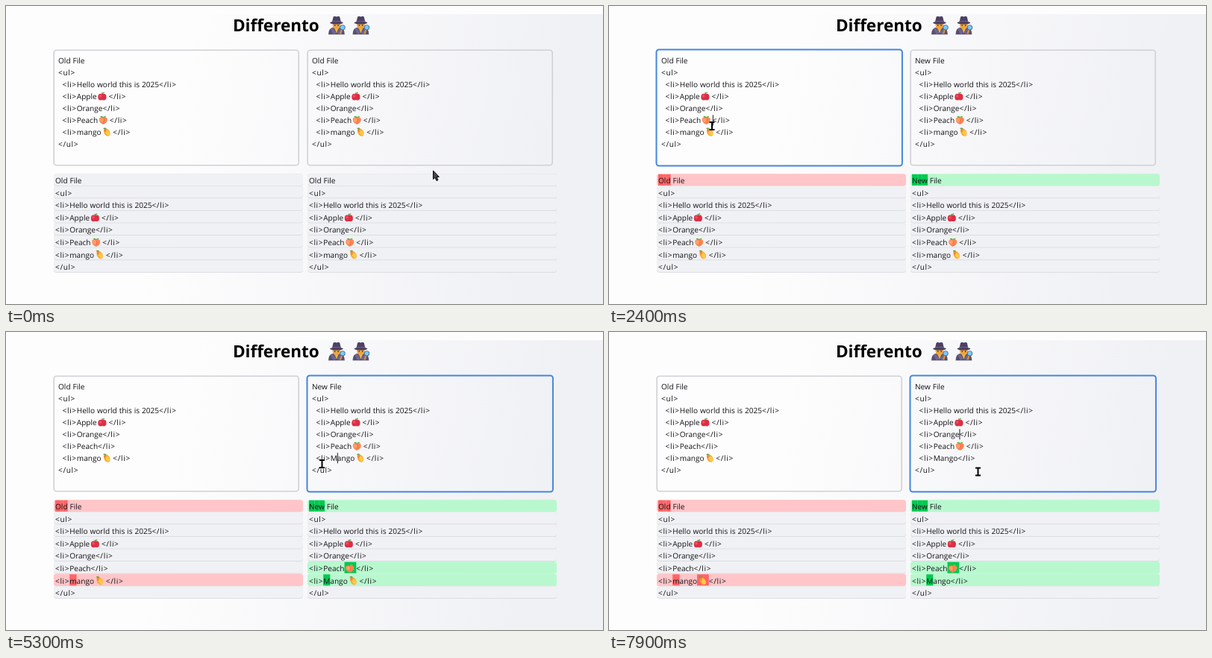
Animation, 800 px wide and 400 px high, one loop 8 s. Source, as an HTML page with a canvas:

```html
<!DOCTYPE html>
<html lang="en">
<head>
<meta charset="utf-8">
<title>Differento</title>
<style>
  html, body { margin: 0; width: 100%; height: 100%; overflow: hidden; background: #fdfdfd; }
  canvas { display: block; width: 800px; height: 400px; }
</style>
</head>
<body>
<canvas id="stage" width="800" height="400"></canvas>
<script>
const ctx = document.getElementById('stage').getContext('2d');
const LOOP = 8000;
const FONT = '10.08px "Open Sans", "Noto Sans", sans-serif';
const EMOJI_WIDTH = 15.8;
const PANEL_X = [64, 404];
const SIDES = [
  { row: '#ffc5c8', mark: '#ff6467' },
  { row: '#b9f8cf', mark: '#00c950' },
];
const START = [
  'Old File', '<ul>', '  <li>Hello world this is 2025</li>', '  <li>Apple🍎</li>',
  '  <li>Orange</li>', '  <li>Peach🍑</li>', '  <li>mango🥭</li>', '</ul>',
];

// Clicks and key presses: time, side, row, text before and after the caret
const STEPS = [
  [700, 1, 0, 'Old', ' File'],
  [1000, 1, 0, 'Ol', ' File'],
  [1100, 1, 0, 'O', ' File'],
  [1200, 1, 0, '', ' File'],
  [1400, 1, 0, 'N', ' File'],
  [1500, 1, 0, 'Ne', ' File'],
  [1600, 1, 0, 'New', ' File'],
  [2100, 0, 5, '  <li>Peach🍑', '</li>'],
  [2700, 0, 5, '  <li>Peach', '</li>'],
  [3400, 1, 6, '  <li>m', 'ango🥭</li>'],
  [3800, 1, 6, '  <li>', 'ango🥭</li>'],
  [4900, 1, 6, '  <li>M', 'ango🥭</li>'],
  [5500, 1, 6, '  <li>Mango🥭', '</li>'],
  [5800, 1, 6, '  <li>Mango', '</li>'],
  [7500, 1, 4, '  <li>Orange', '</li>'],
];

// Pointer stops: time, x, y
const POINTER = [
  [0, 572, 220.5], [700, 419, 75], [950, 476.5, 235.5], [1750, 476.5, 235.5],
  [2100, 138, 155], [2400, 138, 161], [2800, 138, 161], [3400, 436, 170],
  [3750, 471, 236], [4900, 471, 236], [5300, 423.5, 177], [5500, 480, 170],
  [5700, 480, 170], [6000, 300, 345], [6300, 115, 327], [6600, 115, 327],
  [7500, 472, 140], [7900, 494.5, 187.5], [8000, 494.5, 187.5],
];

function box(x, y, w, h, r, fill) {
  ctx.beginPath();
  ctx.roundRect(x, y, w, h, r);
  ctx.fillStyle = fill;
  ctx.fill();
}

function blob(fill, x, y, rx, ry, turn = 0) {
  ctx.beginPath();
  ctx.ellipse(x, y, rx, ry, turn, 0, 7);
  ctx.fillStyle = fill;
  ctx.fill();
}

function shape(fill, path) {
  ctx.fillStyle = fill;
  ctx.fill(new Path2D(path));
}

function at(x, y, scale, draw) {
  ctx.save();
  ctx.translate(x, y);
  ctx.scale(scale, scale);
  draw();
  ctx.restore();
}

// Icons are drawn around their centre
const ICONS = {
  '🍎'() {
    blob('#dd2f45', -2.1, 1, 3.8, 4.6);
    blob('#dd2f45', 2.1, 1, 3.8, 4.6);
    blob('#ee5266', -2.4, -0.4, 1.8, 2);
    box(-0.5, -5.6, 1, 2.6, 0.5, '#7d4533');
    blob('#5fae52', 1.6, -4.8, 1.8, 0.9, -0.4);
  },
  '🍑'() {
    shape('#ff8552', 'M0 6.2C-4 4.5-6.2 2-5.8-1.2C-5.4-4.2-2-5 0-3C2-5 5.4-4.2 5.8-1.2C6.2 2 4 4.5 0 6.2Z');
    blob('#ffa267', -2.4, -0.2, 2.4, 2.8);
    shape('#f2665a', 'M.5-3Q3 1 0 6Q1.4 1 .5-3');
    blob('#5aa845', -1.9, -4.5, 2.2, 1, 0.3);
    blob('#6cba50', 1.9, -4.5, 2.2, 1, -0.3);
  },
  '🥭'() {
    blob('#f9a52c', 0.6, 0.6, 4, 5.7, -0.5);
    blob('#ffc94a', 1.6, 1.4, 2.6, 4, -0.5);
    blob('#ee8a3c', -2.2, -2.2, 1.6, 2.2, -0.5);
    blob('#6a9a42', -2.4, -5, 2.2, 0.9, 0.1);
  },
};

function detective() {
  shape('#574f73', 'M-12 13Q-12 4-5 3L4 3Q11 4 11 13Z');
  blob('#f0a53a', -0.5, -0.5, 5.6, 6.2);
  shape('#6f6690', 'M-6 3L-1 11L-5 13L-9 5ZM5 3L0 11L4 13L8 5Z');
  shape('#e8b64a', 'M-3 5L2 5L-.5 11Z');
  shape('#4a4164', 'M-7-4L-5-12Q-3-14-.5-12Q2-14 4-12L6-4Z');
  box(-6.5, -6.4, 12, 2, 0, '#8a5a8f');
  blob('#4a4164', -0.5, -3.6, 9.3, 2);
  blob('#3d3045', -2.8, 0, 0.8, 1);
  blob('#3d3045', 1.8, 0, 0.8, 1);
  ctx.strokeStyle = '#e0913a';
  ctx.lineWidth = 2.2;
  ctx.stroke(new Path2D('M7 6L5 12'));
  blob('#3d6fa5', 8, 3, 3.9, 3.9);
  blob('#7cc8f2', 8, 3, 2.9, 2.9);
}

const split = text => text.split(/(<.*?>|[🍎🍑🥭])/u).filter(Boolean);

function partWidth(part) {
  if (ICONS[part]) return EMOJI_WIDTH;
  ctx.letterSpacing = part[0] === '<' ? '0.65px' : '0px';
  return ctx.measureText(part).width;
}

const textWidth = text => split(text).reduce((sum, part) => sum + partWidth(part), 0);

function drawLine(text, x, baseline, marks = [], markColor) {
  let index = 0;
  for (const part of split(text)) {
    const width = partWidth(part);
    const chars = Array.from(part);
    chars.forEach((char, i) => {
      if (!marks[index++]) return;
      const left = x + partWidth(chars.slice(0, i).join(''));
      box(left, baseline - 12.2, partWidth(char), 15, 0, markColor);
    });
    if (ICONS[part]) {
      at(x + 7.2, baseline - 3.8, 0.95, ICONS[part]);
    } else {
      partWidth(part);
      ctx.fillStyle = '#121216';
      ctx.fillText(part, x, baseline);
    }
    x += width;
  }
}

// Marks the characters of both lines outside their longest common subsequence
function diff(a, b) {
  const lengths = Array.from({ length: a.length + 1 }, () => Array(b.length + 1).fill(0));
  for (let i = a.length - 1; i >= 0; i--)
    for (let j = b.length - 1; j >= 0; j--)
      lengths[i][j] = a[i] === b[j]
        ? lengths[i + 1][j + 1] + 1
        : Math.max(lengths[i + 1][j], lengths[i][j + 1]);
  const marks = [a.map(() => true), b.map(() => true)];
  for (let i = 0, j = 0; i < a.length && j < b.length;) {
    if (a[i] === b[j]) marks[0][i++] = marks[1][j++] = false;
    else if (lengths[i + 1][j] >= lengths[i][j + 1]) i++;
    else j++;
  }
  return marks;
}

function drawBackground() {
  const shade = ctx.createLinearGradient(250, 0, 740, 90);
  shade.addColorStop(0, '#fdfdfd');
  shade.addColorStop(1, '#f0f1f5');
  box(0, 0, 800, 400, 0, shade);
  box(0, 0, 800, 11, 0, '#fdfdfd');
  ctx.letterSpacing = ctx.wordSpacing = '0px';
  ctx.font = '700 22.5px "Open Sans", "Noto Sans", sans-serif';
  ctx.fillStyle = '#000';
  ctx.fillText('Differento', 303.9, 34.4);
  at(443.4, 26, 0.95, detective);
  at(475.9, 26, 0.95, detective);
  ctx.font = FONT;
  ctx.wordSpacing = '0.3px';
}

function drawEditor(side, lines, focused) {
  const grow = focused ? 0.7 : 0;
  ctx.beginPath();
  ctx.roundRect(PANEL_X[side] + 0.2 - grow, 59.2 - grow, 328 + 2 * grow, 154.6 + 2 * grow, 3.5);
  ctx.strokeStyle = focused ? '#4486dd' : '#d0d1d5';
  ctx.lineWidth = focused ? 2 : 1.6;
  ctx.stroke();
  lines.forEach((line, i) => drawLine(line, PANEL_X[side] + 6, 77.2 + 15.95 * i));
}

function drawResult(left, right) {
  left.forEach((_, i) => {
    const pair = [left[i], right[i]].map(line => line.replace(/^  /, ''));
    const marks = diff(...pair.map(line => Array.from(line)));
    pair.forEach((line, side) => {
      const x = PANEL_X[side], y = 225.2 + 16.57 * i;
      const changed = marks[side].includes(true);
      box(x, y, 334, 16.57, 3.5, changed ? SIDES[side].row : '#d3d6dc');
      if (!changed) box(x, y, 334, 15.8, 3.5, '#f0f1f4');
      drawLine(line, x + 2, y + 12.9, marks[side], SIDES[side].mark);
    });
  });
}

function drawPointer(time) {
  const next = POINTER.findIndex(stop => stop[0] > time);
  const [t0, x0, y0] = POINTER[next - 1], [t1, x1, y1] = POINTER[next];
  const p = (time - t0) / (t1 - t0), ease = p * p * (3 - 2 * p);
  const x = x0 + (x1 - x0) * ease, y = y0 + (y1 - y0) * ease;
  const overText = y > 59 && y < 214 && PANEL_X.some(left => x > left && x < left + 328);
  at(x, y, 1, () => {
    ctx.strokeStyle = '#000';
    if (overText) {
      ctx.lineWidth = 2;
      ctx.stroke(new Path2D('M-3.5-5H3.5M0-5V5M-3.5 5H3.5'));
    } else {
      const arrow = 'M.5 .5V12L3 9.7L5 14L6.9 13.1L5 8.9H8.3Z';
      shape('#4b484c', arrow);
      ctx.lineWidth = 1;
      ctx.stroke(new Path2D(arrow));
    }
  });
}

function draw(time) {
  const files = [[...START], [...START]];
  const done = STEPS.filter(step => step[0] <= time);
  for (const [, side, row, before, after] of done) files[side][row] = before + after;
  const [since, side, row, before] = done.at(-1) || [];

  drawBackground();
  files.forEach((lines, i) => drawEditor(i, lines, i === side));
  if (done.length && (time - since) % 1000 < 500)
    box(PANEL_X[side] + 6 + textWidth(before), 66.5 + 15.95 * row, 0.9, 14, 0, '#000');
  drawResult(...files);
  drawPointer(time);
}

ctx.textRendering = 'geometricPrecision';
const begin = performance.now();
function tick() {
  draw((performance.now() - begin) % LOOP);
  requestAnimationFrame(tick);
}
tick();
</script>
</body>
</html>
```
